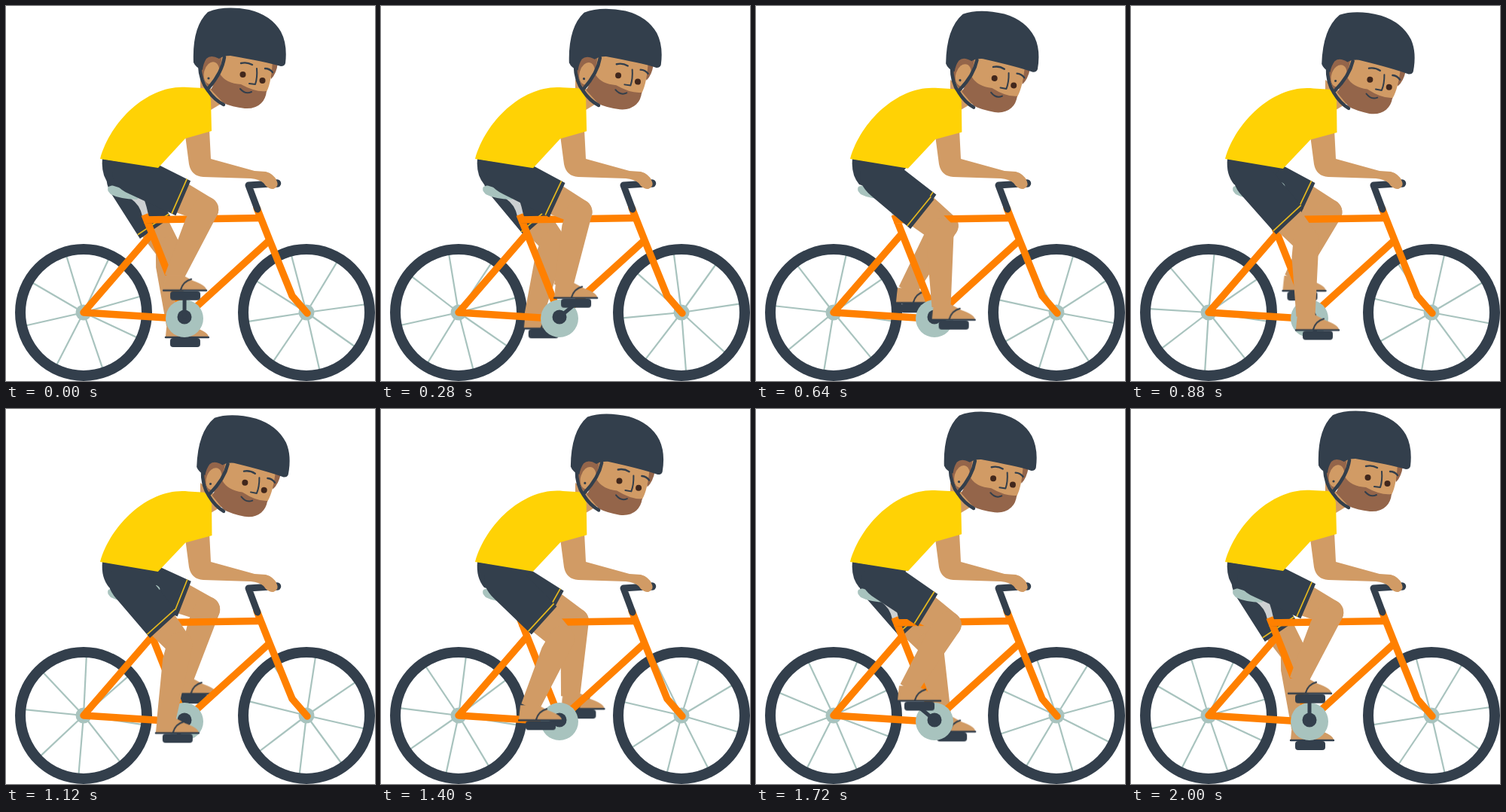
An HTML page without scripts for the animation above (2.04 s loop, 490 by 498 pixels).

```html
<!DOCTYPE html>
<html lang="en">
<head>
<meta charset="utf-8">
<title>Cyclist</title>
<style>
html, body { margin: 0; width: 100%; height: 100%; overflow: hidden; background: #fff; }
svg { display: block; width: 490px; height: 498px; }

.navy { fill: #333f4c; }
.skin { fill: #d19b65; }
.hair { fill: #94654a; }
.steel { fill: #a8c3be; }
.gold { stroke: #e6b91e; stroke-width: 1.7; }
.line { fill: none; stroke: #333f4c; stroke-linecap: round; stroke-linejoin: round; }
.tube { fill: none; stroke: #ff8000; stroke-width: 9.5; stroke-linejoin: round; }
.spokes { stroke: #a8c3be; stroke-width: 2.2; }

/* one turn takes 2000 ms, then a 40 ms rest */
.spin, .orbit, .thigh, .shin, .nod, .lean { animation: 2040ms linear infinite; }
.spin { animation-name: spin; }
.orbit { animation-name: orbit; }
.near .thigh { animation-name: near-thigh; }
.near .shin { animation-name: near-shin; }
.far .thigh { animation-name: far-thigh; }
.far .shin { animation-name: far-shin; }
.nod, .lean { animation-timing-function: cubic-bezier(.37, 0, .63, 1); }
.nod { animation-name: nod; transform-origin: 222px 134px; }
.lean { animation-name: lean; transform-origin: 130px 203px; }

@keyframes spin { 98.04%, 100% { rotate: 360deg; } }
@keyframes orbit {
  0% { transform: rotate(0deg) translateY(var(--r)) rotate(0deg); }
  98.04%, 100% { transform: rotate(360deg) translateY(var(--r)) rotate(-360deg); }
}
@keyframes nod { 0%, 98.04%, 100% { rotate: 0deg; } 49.02% { rotate: 4.3deg; } }
@keyframes lean { 0%, 98.04%, 100% { rotate: 0deg; } 49.02% { rotate: .8deg; } }

@keyframes near-thigh {
  0% { rotate: 26.6deg; }
  8.17% { rotate: 26deg; }
  16.34% { rotate: 29.3deg; }
  24.51% { rotate: 35.6deg; }
  32.68% { rotate: 43.1deg; }
  40.85% { rotate: 49.3deg; }
  49.02% { rotate: 51.8deg; }
  57.19% { rotate: 50.8deg; }
  65.36% { rotate: 47.5deg; }
  73.53% { rotate: 42.6deg; }
  81.7% { rotate: 36.7deg; }
  89.87% { rotate: 30.8deg; }
  98.04%, 100% { rotate: 26.6deg; }
}
@keyframes near-shin {
  0% { rotate: -1.7deg; }
  8.17% { rotate: -8.8deg; }
  16.34% { rotate: -19.9deg; }
  24.51% { rotate: -32.6deg; }
  32.68% { rotate: -44.2deg; }
  40.85% { rotate: -50.7deg; }
  49.02% { rotate: -48.2deg; }
  57.19% { rotate: -38.5deg; }
  65.36% { rotate: -25.9deg; }
  73.53% { rotate: -13.8deg; }
  81.7% { rotate: -4.5deg; }
  89.87% { rotate: -.2deg; }
  98.04%, 100% { rotate: -1.7deg; }
}
@keyframes far-thigh {
  0% { rotate: 59.1deg; }
  8.17% { rotate: 55.6deg; }
  16.34% { rotate: 50.3deg; }
  24.51% { rotate: 43.9deg; }
  32.68% { rotate: 36.7deg; }
  40.85% { rotate: 29.7deg; }
  49.02% { rotate: 24.9deg; }
  57.19% { rotate: 24.5deg; }
  65.36% { rotate: 28.9deg; }
  73.53% { rotate: 37.2deg; }
  81.7% { rotate: 47.6deg; }
  89.87% { rotate: 56.9deg; }
  98.04%, 100% { rotate: 59.1deg; }
}
@keyframes far-shin {
  0% { rotate: -65deg; }
  8.17% { rotate: -49.1deg; }
  16.34% { rotate: -31.6deg; }
  24.51% { rotate: -17deg; }
  32.68% { rotate: -6deg; }
  40.85% { rotate: 0deg; }
  49.02% { rotate: -.8deg; }
  57.19% { rotate: -8.5deg; }
  65.36% { rotate: -21.7deg; }
  73.53% { rotate: -38.1deg; }
  81.7% { rotate: -55.6deg; }
  89.87% { rotate: -68.5deg; }
  98.04%, 100% { rotate: -65deg; }
}
</style>
</head>
<body>
<svg viewBox="0 0 490 498" xmlns="http://www.w3.org/2000/svg">
  <defs>
    <path id="spoke" d="M0 0H79"/>
    <path id="thigh" class="skin" d="M80-21L130-17A17 17 0 0 1 130 17L80 23Z"/>
    <path id="shin" class="skin" d="M-17 0A17 17 0 0 1 17 0L12 101H-13L-19 22Z"/>
    <g id="shorts">
      <path class="navy" d="M0-25H95L98 25L30 27Q6 28-3 12Z"/>
      <path class="gold" d="M89.5-25L92 25"/>
    </g>
    <g id="foot">
      <path class="skin" d="M-29-1Q-28-12-27-20L-3-20L10-13Q27-7 28-1Z"/>
      <path class="line" stroke-width="2.2" d="M-6-1Q-3-12 8-15"/>
      <path class="line" stroke-width="2.4" d="M-29 0H28"/>
    </g>
    <rect id="pedal" class="navy" x="-20" y="1" width="40" height="12" rx="4"/>
    <g id="tyre">
      <circle class="line" r="84" stroke-width="14"/>
      <circle class="steel" r="10.5"/>
    </g>
  </defs>

  <!-- wheels -->
  <g transform="translate(103 407)">
    <g class="spin spokes">
      <use href="#spoke" transform="rotate(25)"/><use href="#spoke" transform="rotate(71)"/>
      <use href="#spoke" transform="rotate(117)"/><use href="#spoke" transform="rotate(167)"/>
      <use href="#spoke" transform="rotate(210)"/><use href="#spoke" transform="rotate(253)"/>
      <use href="#spoke" transform="rotate(295)"/><use href="#spoke" transform="rotate(344)"/>
    </g>
    <use href="#tyre"/>
  </g>
  <g transform="translate(399 407)">
    <g class="spin spokes">
      <use href="#spoke" transform="rotate(-8)"/><use href="#spoke" transform="rotate(35)"/>
      <use href="#spoke" transform="rotate(77)"/><use href="#spoke" transform="rotate(124)"/>
      <use href="#spoke" transform="rotate(171)"/><use href="#spoke" transform="rotate(212)"/>
      <use href="#spoke" transform="rotate(255)"/><use href="#spoke" transform="rotate(301)"/>
    </g>
    <use href="#tyre"/>
  </g>

  <!-- far leg -->
  <g class="far">
    <g transform="translate(241 408) scale(.9 1)">
      <g class="orbit" style="--r:32px">
        <g transform="scale(1.111 1)">
          <use href="#pedal" x="-3"/>
          <use href="#foot"/>
        </g>
      </g>
    </g>
    <g transform="translate(149 212)">
      <g class="thigh">
        <use href="#thigh"/>
        <g transform="translate(130 0)"><g class="shin"><use href="#shin"/></g></g>
        <use href="#shorts"/>
      </g>
    </g>
  </g>

  <!-- saddle and frame -->
  <path fill="#cdd0d2" d="M168 250L183 255Q187 267 189 277L181 279Q178 264 166 256Z"/>
  <path class="steel" d="M136 240Q150 233 200 234Q207 238 203 242Q190 245 180 250L174 257Q150 256 139 250Q133 244 136 240Z"/>
  <path class="tube" d="M183 284L339 281.5M184 277L235 405M193 303L103 407L220 414.5M350 311L240 411"/>
  <path class="tube" d="M333 268L350 311L380 385L400 408" stroke-linecap="round"/>
  <path class="line" stroke-width="9" stroke-linecap="butt" d="M334 270L322 238L360 235.5"/>

  <!-- crank -->
  <g transform="translate(237 413)">
    <circle class="steel" cy="2" r="25"/>
    <circle class="navy" r="9.5"/>
    <path class="line spin" stroke-width="5" d="M0 0V-25"/>
  </g>

  <!-- near leg -->
  <g class="near">
    <g transform="translate(238 405)">
      <g class="orbit" style="--r:-27.3px"><use href="#pedal"/></g>
    </g>
    <path class="navy" d="M128 203Q126 224 137 237L172 248L200 214Z"/>
    <g transform="translate(149 212)">
      <g class="thigh">
        <use href="#thigh"/>
        <g transform="translate(130 0)"><g class="shin"><use href="#shin"/></g></g>
        <use href="#shorts"/>
      </g>
    </g>
    <g transform="translate(238 405)">
      <g class="orbit" style="--r:-27.3px"><use href="#foot"/></g>
    </g>
  </g>

  <!-- upper body -->
  <path class="skin" d="M238 172L243 210Q246 226 262 227L325 229Q336 230 342 235Q347 243 355 243Q363 240 360 232Q354 222 345 220L330 219L272 203L270 164Z"/>
  <path class="skin" d="M258 98L292 126L272 138L258 122Z"/>
  <path class="lean" fill="#ffd205" d="M125 203C140 149 192 103 241 108L262 109Q270 114 272 124L273 166L238 176L202 215Z"/>

  <!-- head -->
  <g class="nod">
    <path class="hair" d="M257 60H292L285 100L269 109Q260 98 257 78Z"/>
    <ellipse class="skin" cx="273" cy="89" rx="10" ry="15" transform="rotate(14 273 89)"/>
    <circle class="navy" cx="269" cy="96" r="1.6"/>
    <path class="hair" d="M346 70L361 76Q359 90 352 97Z"/>
    <path class="skin" d="M288 56L354 70Q353 100 346 114L280 112L284 88Z"/>
    <path class="hair" d="M284 90Q292 103 312 104Q332 115 346 113Q345 123 339 129Q331 137 317 136Q300 134 289 129L272 111Z"/>
    <g class="line" stroke-width="2">
      <path d="M333 83Q334 95 331 104L323 103"/>
      <path d="M311 110Q318 118 326 114"/>
      <path stroke-width="2.4" d="M312 76Q320 74 327 78M344 83Q350 83 354 88"/>
    </g>
    <circle fill="#41271c" cx="314.5" cy="91" r="4"/>
    <circle fill="#41271c" cx="340.5" cy="99" r="4"/>
    <path class="line" stroke-width="4.5" d="M257 78Q258 100 268 112Q277 125 289 131M290 68Q287 88 269 109"/>
    <path class="navy" d="M249 75Q247 28 268 8Q290 -1 323 5Q352 12 365 34Q374 51 371 76Q370 80 365 80Q345 74 298 66Q288 66 283 70Q272 64 266 70Q262 76 261 85Q252 82 249 75Z"/>
  </g>
  <circle class="navy" cx="360" cy="235.5" r="5.2"/>
  <path class="skin" d="M340 226L350 222Q363 232 360 239Q354 246 347 240Z"/>
</svg>
</body>
</html>
```
